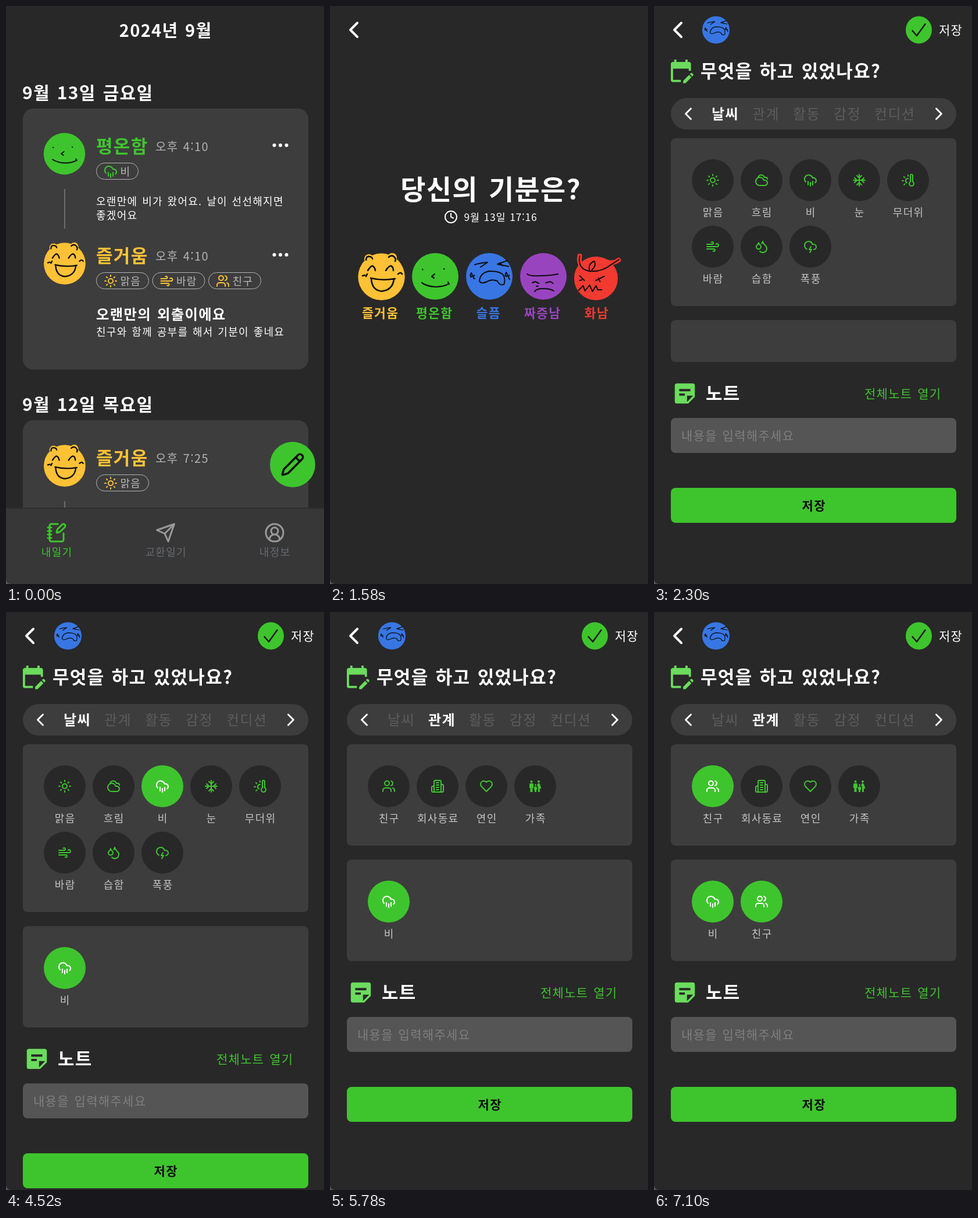
An HTML page for the animation above (8000 ms loop, 547 px wide and 992 px high).

```html
<!DOCTYPE html>
<html lang="ko">
<head>
<meta charset="utf-8">
<title>기분 일기</title>
<style>
html, body { margin: 0; width: 100%; height: 100%; overflow: hidden; background: #282828; }
svg { display: block; width: 100vw; height: 100vh; }
text { font-family: "Noto Sans CJK KR", "Noto Sans CJK", "Noto Sans CJK JP", sans-serif; letter-spacing: 1.3px; word-spacing: .075em; }
.line { fill: none; stroke-linecap: round; stroke-linejoin: round; }
</style>
</head>
<body>
<svg id="stage" viewBox="0 0 547 992"></svg>
<script>
const GREEN = '#3ec52d', LIGHT = '#6bdc5d', YELLOW = '#ffc135', BLUE = '#3876e3',
      PURPLE = '#9944bf', RED = '#f23a30', DARK = '#282828', PANEL = '#3d3d3d';

// Stroked icons on a 24 x 24 grid
const ICONS = {
  sun: 'M16 12a4 4 0 1 0-8 0a4 4 0 1 0 8 0M12 2v2M12 20v2M4.93 4.93l1.41 1.41M17.66 17.66l1.41 1.41M2 12h2M20 12h2M6.34 17.66l-1.41 1.41M19.07 4.93l-1.41 1.41',
  cloudy: 'M17.5 21H9a7 7 0 1 1 6.71-9h1.79a4.5 4.5 0 1 1 0 9ZM22 10a3 3 0 0 0-3-3h-2.2a5.5 5.5 0 0 0-10.7.5',
  rain: 'M4 14.9A7 7 0 1 1 15.71 8h1.79a4.5 4.5 0 0 1 2.5 8.24M16 14v6M8 14v6M12 16v6',
  snow: 'M2 12h20M12 2v20M20 16l-4-4 4-4M4 8l4 4-4 4M16 4l-4 4-4-4M8 20l4-4 4 4',
  heat: 'M12 9a4 4 0 0 0-2 7.5M12 3v2M6.6 18.4l-1.4 1.4M20 4v10.54a4 4 0 1 1-4 0V4a2 2 0 0 1 4 0ZM4 13H2M6.34 7.34 4.93 5.93',
  wind: 'M17.7 7.7a2.5 2.5 0 1 1 1.8 4.3H2M9.6 4.6A2 2 0 1 1 11 8H2M12.6 19.4A2 2 0 1 0 14 16H2',
  drops: 'M7 16.3c2.2 0 4-1.83 4-4.05 0-1.16-.57-2.26-1.71-3.19S7.29 6.75 7 5.3c-.29 1.45-1.14 2.84-2.29 3.76S3 11.1 3 12.25c0 2.22 1.8 4.05 4 4.05zM12.56 6.6A10.97 10.97 0 0 0 14 3.02c.5 2.5 2 4.9 4 6.5s3 3.5 3 5.5a6.98 6.98 0 0 1-11.91 4.97',
  storm: 'M6 16.33A7 7 0 1 1 15.71 8h1.79a4.5 4.5 0 0 1 .5 8.97M13 12l-3 5h4l-3 5',
  users: 'M13 7a4 4 0 1 0-8 0a4 4 0 1 0 8 0M16 21v-2a4 4 0 0 0-4-4H6a4 4 0 0 0-4 4v2M22 21v-2a4 4 0 0 0-3-3.87M16 3.13a4 4 0 0 1 0 7.75',
  office: 'M6 22V4a2 2 0 0 1 2-2h8a2 2 0 0 1 2 2v18ZM6 12H4a2 2 0 0 0-2 2v6a2 2 0 0 0 2 2h2M18 9h2a2 2 0 0 1 2 2v9a2 2 0 0 1-2 2h-2M10 6h4M10 10h4M10 14h4M10 18h4',
  heart: 'M19 14c1.49-1.46 3-3.21 3-5.5A5.5 5.5 0 0 0 16.5 3c-1.76 0-3 .5-4.5 2-1.5-1.5-2.74-2-4.5-2A5.5 5.5 0 0 0 2 8.5c0 2.3 1.5 4.05 3 5.5l7 7Z',
  pencil: 'M21.17 6.81a1 1 0 0 0-3.98-3.99L3.84 16.17a2 2 0 0 0-.5.83l-1.32 4.36a.5.5 0 0 0 .62.62L7 20.66a2 2 0 0 0 .83-.5zM15 5l4 4',
  diary: 'M13.4 2H6a2 2 0 0 0-2 2v16a2 2 0 0 0 2 2h12a2 2 0 0 0 2-2v-7.4M2 6h4M2 10h4M2 14h4M2 18h4M21.38 5.63a1 1 0 1 0-3-3l-5.01 5a2 2 0 0 0-.51.86l-.84 2.87a.5.5 0 0 0 .62.62l2.87-.84a2 2 0 0 0 .85-.5z',
  send: 'M22 2 11 13M22 2l-7 20-4-9-9-4z',
  user: 'M22 12a10 10 0 1 0-20 0a10 10 0 1 0 20 0M16 10a4 4 0 1 0-8 0a4 4 0 1 0 8 0M18 20a6 6 0 0 0-12 0',
  clock: 'M22 12a10 10 0 1 0-20 0a10 10 0 1 0 20 0M12 6v6l4 2',
  left: 'M15 18l-6-6 6-6',
  right: 'M9 18l6-6-6-6'
};

// Filled icons on the same grid
const SOLID = {
  family: 'M16 4a2 2 0 0 1 4 0a2 2 0 0 1-4 0M20 22v-6h2.5l-2.54-7.63A2 2 0 0 0 18.06 7h-.12a2 2 0 0 0-1.9 1.37l-.86 2.58A3.5 3.5 0 0 1 17 14v8zM11 10a1.5 1.5 0 0 1 3 0a1.5 1.5 0 0 1-3 0M3.5 4a2 2 0 0 1 4 0a2 2 0 0 1-4 0M7.5 22v-7H9V9a2 2 0 0 0-2-2H4a2 2 0 0 0-2 2v6h1.5v7zM14 22v-4h1v-4a1.5 1.5 0 0 0-1.5-1.5h-2A1.5 1.5 0 0 0 10 14v4h1v4z',
  note: 'M19 3H5a2 2 0 0 0-2 2v14a2 2 0 0 0 2 2h10l6-6V5a2 2 0 0 0-2-2M7 8h10v2H7zM12 14H7v-2h5zM14 19.5V14h5.5z',
  calendar: 'M12 22H5a2 2 0 0 1-2-2V6a2 2 0 0 1 2-2h1V2h2v2h8V2h2v2h1a2 2 0 0 1 2 2v6h-2v-2H5v10h7zM22.13 16.99l.71-.71a1 1 0 0 0 0-1.41l-.71-.71a1 1 0 0 0-1.41 0l-.71.71zM21.42 17.7l-5.3 5.3H14v-2.12l5.3-5.3z'
};

// Faces: colour, base shape, ink width and ink, drawn around 0,0 with a radius of 40
const FACES = {
  joy: [YELLOW, '<circle cx="-21" cy="-30" r="8"/><circle cx="19" cy="-32" r="8"/><circle cx=".5" cy=".8" r="40.2"/>', 2.6,
    'M-26-28q0-7 6-6q5 1 5 4M13-33q5-5 10 0q3 4 1 7M-23-10q5-8 8-8q4 2 5 8M8-10q5-8 9-8q4 2 4 8M-18 3q20 5 42 1M-17 4q1 20 18 21.5q19-2 21-21M-32-1l4-1M-26 0l2-4M29-4l3-2M34-6l2 2'],
  calm: [GREEN, '<circle r="40"/>', 2.2,
    'M-22-12l.5 .5M15-13l.5 .5M-1-4l-5 4 4 3M-23 11q8 6 23 7q14 0 23-5M22 10l2 3'],
  sad: [BLUE, '<circle r="40"/>', 2,
    'M-25-20Q-12-24-3-24L-15-16M31-27L14-21L33-17M-17 8Q-16-6 0-9Q20-9 25-1Q28 8 25 14Q17 16 14 8Q4 4-4 9Q-14 14-17 8M-31-6q-3 6 0 7q4-1 0-7M-26-2q-3 6 1 6M29-7q-3 7 1 7q3-1-1-7M34-2q-2 5 1 7M18-23l5 5'],
  annoyed: [PURPLE, '<circle r="40"/>', 2,
    'M-28-4Q-22 0-8-1Q12-1 25-4M-19 11l5-2 6 3M4 11l8-2 5 3M-15 26Q-12 21 0 21Q12 21 18 25M-12 17l3 0'],
  angry: [RED, '<circle cy=".5" r="37.6"/><path d="M-25-20Q-30-28-28-38M8-31Q28-22 39-31" fill="none" stroke="#f23a30" stroke-width="8" stroke-linecap="round"/>', 2,
    'M-28-38Q-32-16-12-12Q10-10 26-23L40-32M-11-12Q-14-25-3-29Q2-22-9-12M-28-4l8 8M-28 4l4-1M0 4l14-7M4 0l3 6M-30 21l8-8 3 9 8-10 5 11 6-10 3 7 7 0']
};

const circle = (x, y, r, fill) => `<circle cx="${x}" cy="${y}" r="${r}" fill="${fill}"/>`;
const box = (x, y, w, h, r, fill, more = '') =>
  `<rect x="${x}" y="${y}" width="${w}" height="${h}" rx="${r}" fill="${fill}" ${more}/>`;
// y is the middle of the line of text
const text = (str, x, y, size, fill = '#fff', weight = 400, more = '') =>
  `<text x="${x}" y="${y + size * .37}" font-size="${size}" fill="${fill}" font-weight="${weight}" ${more}>${str}</text>`;
const mid = (str, x, y, size, fill, weight) =>
  text(str, x + .65, y, size, fill, weight, 'text-anchor="middle"');
const icon = (name, x, y, size, color) => {
  const place = `transform="translate(${x - size / 2} ${y - size / 2}) scale(${size / 24})"`;
  return SOLID[name]
    ? `<path d="${SOLID[name]}" fill="${color}" fill-rule="evenodd" ${place}/>`
    : `<path class="line" d="${ICONS[name]}" stroke="${color}" stroke-width="2" ${place}/>`;
};
const face = (name, x, y, r) => {
  const [color, shape, width, ink] = FACES[name];
  return `<g transform="translate(${x} ${y}) scale(${r / 40})"><g fill="${color}">${shape}</g>` +
    `<path class="line" d="${ink}" stroke="#0c0c0c" stroke-width="${width}"/></g>`;
};
const corner = '<path d="M0 984Q1 991 8 992H0Z" fill="#5a5a5a"/>';

function entry(y, mood, name, time, tags) {
  const color = FACES[mood][0];
  let x = 155.5;
  const chips = tags.map(([id, label]) => {
    const w = label.length > 1 ? 90 : 72;
    const chip = box(x, y + 28.5, w, 28, 14, 'none', 'stroke="#b4b4b4"') +
      icon(id, x + 24.5, y + 43, 24, color) + text(label, x + 41, y + 43, 18, '#b8b8b8');
    x += w + 6.5;
    return chip;
  }).join('');
  return face(mood, 100.5, y + 12.5, 35.7) +
    text(name, 155, y, 31, color, 700) + text(time, 257, y + 1, 20, '#b4b4b4') + chips;
}
const dots = y => [461.5, 472, 482.5].map(x => circle(x, y, 3, '#fff')).join('');
const rule = (y, h) => box(100, y, 2, h, 0, '#6c6c6c');

const diary = () =>
  mid('2024년 9월', 274, 42, 29, '#fff', 700) +
  text('9월 13일 금요일', 28, 149, 30, '#fff', 700) +
  box(29, 176, 491, 448, 18, PANEL) +
  entry(241, 'calm', '평온함', '오후 4:10', [['rain', '비']]) + dots(239) + rule(314, 68) +
  text('오랜만에 비가 왔어요. 날이 선선해지면', 155, 335, 18) + text('좋겠어요', 155, 359, 18) +
  entry(429, 'joy', '즐거움', '오후 4:10', [['sun', '맑음'], ['wind', '바람'], ['users', '친구']]) + dots(427) +
  text('오랜만의 외출이에요', 155, 529, 24.4, '#fff', 700) +
  text('친구와 함께 공부를 해서 기분이 좋네요', 155, 559, 18) +
  text('9월 12일 목요일', 28, 684, 30, '#fff', 700) +
  box(29, 711, 491, 200, 18, PANEL) +
  entry(776, 'joy', '즐거움', '오후 7:25', [['sun', '맑음']]) + rule(850, 14) +
  box(0, 862, 547, 130, 0, '#373737') + box(0, 861, 547, 2, 0, '#2e2e2e') +
  circle(493, 787, 39, GREEN) + icon('pencil', 493, 787, 42.5, '#0c0c0c') +
  [['diary', '내일기', 87, GREEN, GREEN], ['send', '교환일기', 274.5, '#999', '#676a70'], ['user', '내정보', 462, '#999', '#676a70']]
    .map(([id, label, x, c1, c2]) => icon(id, x, 904, 36, c1) + mid(label, x, 937, 18, c2)).join('');

const moods = () =>
  icon('left', 41, 41, 48, '#fff') +
  mid('당신의 기분은?', 276, 315, 47, '#fff', 700) +
  icon('clock', 208, 362, 24, '#fff') +
  text('9월 13일 17:16', 230.5, 363, 17.5, '#fff', 400, 'style="letter-spacing:.7px"') +
  [['joy', '즐거움'], ['calm', '평온함'], ['sad', '슬픔'], ['annoyed', '짜증남'], ['angry', '화남']]
    .map(([id, label], i) => face(id, i < 4 ? 88 + 93 * i : 457.5, i < 4 ? 464 : 467, 40) +
      mid(label, 86 + 93 * i, 527, 21.5, FACES[id][0], 700)).join('');

const TABS = ['날씨', '관계', '활동', '감정', '컨디션'];
const ITEMS = [
  [['sun', '맑음'], ['cloudy', '흐림'], ['rain', '비'], ['snow', '눈'], ['heat', '무더위'], ['wind', '바람'], ['drops', '습함'], ['storm', '폭풍']],
  [['users', '친구'], ['office', '회사동료'], ['heart', '연인'], ['family', '가족']]
];

// A panel of round buttons, five to a row
const grid = (top, items, picked) => items.map(([id, label], i) => {
  const x = 101 + 84 * (i % 5), y = top + 72 + 114 * Math.floor(i / 5), on = picked.includes(id);
  return circle(x, y, 36, on ? GREEN : DARK) + icon(id, x, y, 24, on ? '#fff' : GREEN) +
    mid(label, x, y + 55, 18, '#c4c4c4');
}).join('');

function form(tab, picked) {
  const items = ITEMS[tab];
  const chosen = picked.map(id => ITEMS.flat().find(item => item[0] == id));
  const end1 = 287 + 114 * Math.ceil(items.length / 5);
  const top2 = end1 + 24, h2 = chosen.length ? 174 : 72, end2 = top2 + h2;
  return icon('left', 41, 41, 48, '#fff') + face('sad', 106.5, 41, 23.6) +
    `<ellipse cx="455.5" cy="41" rx="22.5" ry="23.5" fill="${GREEN}"/>` +
    '<path class="line" d="M444.5 42.5L452 51L466.5 31" stroke="#1c1c1c" stroke-width="2.6"/>' +
    text('저장', 490, 41, 21) +
    icon('calendar', 46.3, 111.3, 46.2, LIGHT) +
    text('무엇을 하고 있었나요?', 80, 112, 31, '#fff', 700) +
    box(29, 158, 491, 54, 27, PANEL) +
    icon('left', 59, 185, 36, '#fff') + icon('right', 490, 185, 36, '#fff') +
    TABS.map((label, i) => text(label, 99 + 70 * i, 185, 24, i == tab ? '#fff' : '#5c5c5c', i == tab ? 700 : 400)).join('') +
    box(29, 227, 491, end1 - 227, 8, PANEL) + grid(227, items, picked) +
    box(29, top2, 491, h2, 8, PANEL) + grid(top2, chosen, picked) +
    icon('note', 53, end2 + 54, 46, LIGHT) +
    text('노트', 89, end2 + 54, 31, '#fff', 700) +
    text('전체노트 열기', 362, end2 + 54, 21, GREEN) +
    box(29, end2 + 96, 491, 60, 8, '#555') +
    text('내용을 입력해주세요', 47, end2 + 126, 21, '#7f7f7f') +
    box(29, end2 + 216, 491, 60, 8, GREEN) +
    mid('저장', 274.5, end2 + 246, 21, '#0a0a0a', 700);
}

const SCENES = [
  [0, diary()],
  [500, moods()],
  [2300, form(0, [])],
  [4520, form(0, ['rain'])],
  [5780, form(1, ['rain'])],
  [7100, form(1, ['rain', 'users'])]
];

const stage = document.getElementById('stage');
let shown;
function draw() {
  const t = performance.now() % 8000;
  const scene = SCENES.findLast(([start]) => t >= start);
  if (scene != shown) {
    shown = scene;
    stage.innerHTML = box(0, 0, 547, 992, 0, DARK) + scene[1] + corner;
  }
  requestAnimationFrame(draw);
}
draw();
</script>
</body>
</html>
```
